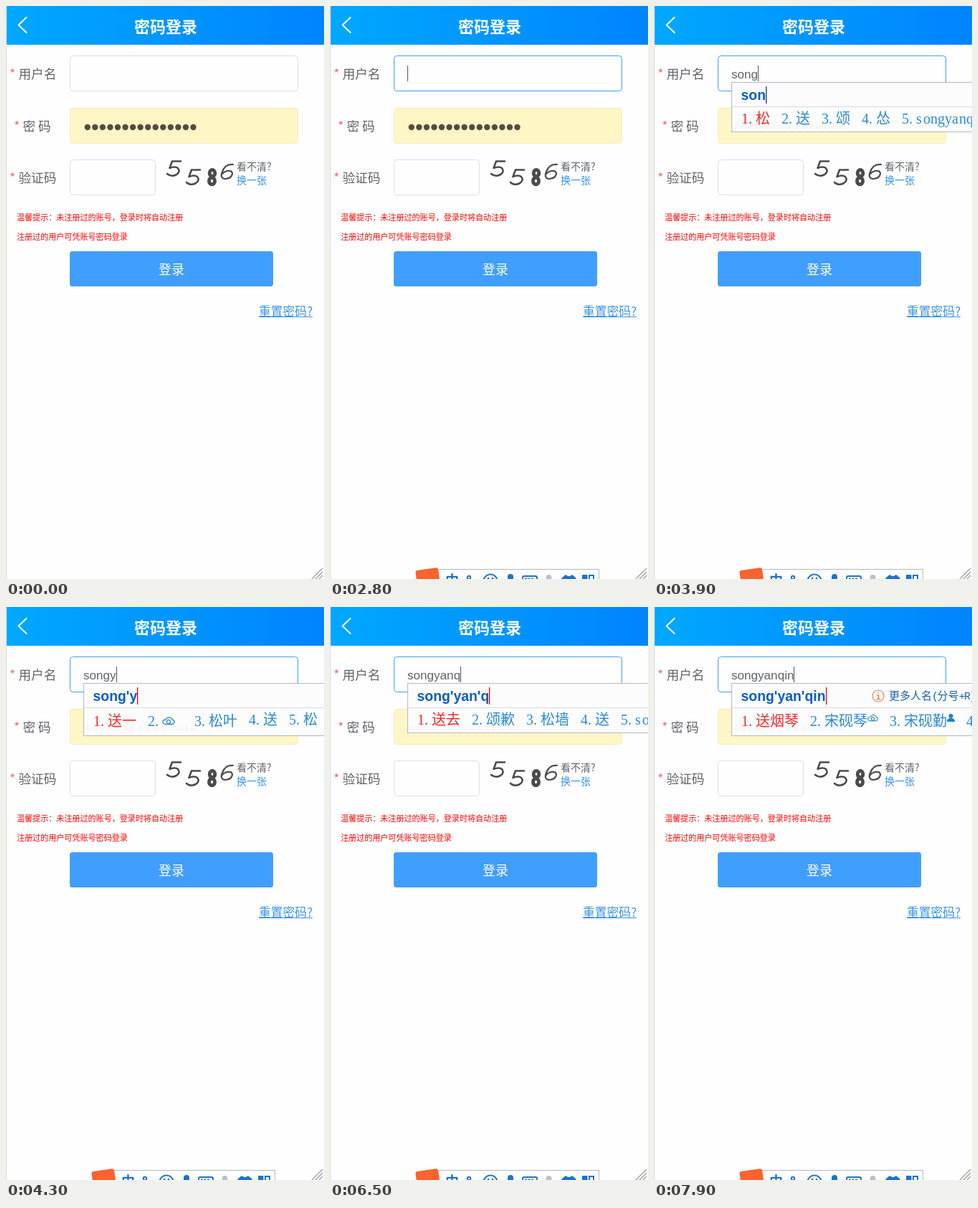
An HTML page that plays this animation: 444 px wide and 799 px high, repeating every 8000 ms.

```html
<!DOCTYPE html>
<html lang="zh-CN">
<head>
<meta charset="utf-8">
<title>密码登录</title>
<style>
  html, body { margin: 0; width: 100%; height: 100%; overflow: hidden; background: #fefefe; }
  svg { display: block; width: 444px; height: 799px; }
  text { font-family: "Noto Sans CJK SC", "Noto Sans CJK", sans-serif; white-space: pre; }
  .label { font-size: 17.6px; fill: #606266; }
  .star { font-size: 17.6px; fill: #f56c6c; }
  .hint { font-size: 11.07px; font-weight: 500; fill: #f00; }
  .box { fill: #fefefe; stroke: #dcdfe6; }
  .value { font: 17.1px "Liberation Sans", sans-serif; fill: #606266; }
  .pinyin { font: bold 19.4px "Liberation Sans", sans-serif; fill: #0b5dc2; }
  .cell { font-family: "Liberation Serif", "Noto Sans CJK SC", "Noto Sans CJK", serif; font-weight: 300; }
  .mono { font-family: "Liberation Mono", "Noto Sans CJK SC", "Noto Sans CJK", monospace; }
  .line { fill: none; stroke-linecap: round; stroke-linejoin: round; }
</style>
</head>
<body>
<svg viewBox="0 0 444 799">
  <defs>
    <linearGradient id="sky"><stop stop-color="#00a8ff"/><stop offset="1" stop-color="#0084ff"/></linearGradient>
    <path id="five" d="M244 216.5H232L228.5 226Q236 223 240 226Q244 231 238 235Q231 239 225 234"/>
    <g id="cloud" class="line" stroke="#2a8ad2" stroke-width="1.3">
      <path d="M-5 4.5Q-9 3 -8 0Q-7 -2 -4 -2Q-2 -6 2 -5Q5 -4 5 -2Q9 -1 8 2Q7 4.5 4 4.5Z"/>
      <circle cy="1" r="2.6"/>
    </g>
    <g id="person" fill="#1a80cc"><circle cx="5.5" cy="3" r="3"/><path d="M0 11Q0 6 5.5 6Q11 6 11 11Z"/></g>
    <g id="info" class="line" stroke="#f2804f" stroke-width="1.2">
      <circle r="8"/><path d="M-1.5 -1H.5V4.5M-2 4.5H2.5M0 -4.5V-4" stroke-width="1.6"/>
    </g>
  </defs>

  <rect width="444" height="799" fill="#fefefe"/>
  <rect width="444" height="54" fill="url(#sky)"/>
  <rect width="1" height="799" fill="#d9dbde"/>
  <path class="line" d="M28.500 16L17.500 26.500L28.500 37" stroke="#fff" stroke-width="2"/>
  <text x="179" y="36.500" font-size="22" font-weight="900" fill="#fff">密码登录</text>

  <text class="star" x="5" y="101">*</text><text class="label" x="17.500" y="101">用户名</text>
  <text class="star" x="11" y="174">*</text><text class="label" x="23.500" y="174">密 码</text>
  <text class="star" x="5" y="246">*</text><text class="label" x="17.500" y="246">验证码</text>

  <rect id="user" class="box" x="89.500" y="69.500" width="318" height="49" rx="4"/>
  <rect x="89.500" y="142.500" width="318" height="49" rx="4" fill="#fff6c6" stroke="#fce9bb"/>
  <g id="dots" fill="#574a41"></g>
  <rect class="box" x="89.500" y="214.500" width="119" height="49" rx="4"/>

  <g class="line" stroke="#4b4b4b" stroke-width="2.600">
    <use href="#five"/><use href="#five" x="27" y="12"/>
    <g stroke-width="4.900"><ellipse cx="288" cy="233" rx="3.800" ry="4.500"/><ellipse cx="287.500" cy="244" rx="4" ry="4.700"/></g>
    <path d="M317 221Q306 220 302 231Q298 241 307 241Q315 240 316 234Q316 229 309 230Q304 231 301 235" stroke-width="2.200"/>
  </g>
  <text x="322" y="229" font-size="14" fill="#606266">看不清?</text>
  <text x="322" y="248" font-size="14" fill="#2f93f0">换一张</text>

  <text class="hint" x="15" y="299">温馨提示：未注册过的账号，登录时将自动注册</text>
  <text class="hint" x="15" y="326">注册过的用户可凭账号密码登录</text>
  <rect x="89" y="342" width="284" height="49" rx="3.500" fill="#409eff"/>
  <text x="213" y="374" font-size="18" fill="#fff">登录</text>
  <text x="353" y="432" font-size="16.800" fill="#3a94ea">重置密码?</text>
  <rect x="353" y="433" width="75" height="1" fill="#3a94ea"/>

  <g id="bar">
    <rect x="140.500" y="785.500" width="235" height="30" fill="#fefefe" stroke="#b3bac4"/>
    <rect x="121" y="785" width="32" height="32" rx="3" fill="#f9632f" transform="rotate(-8 137 800)"/>
    <text x="161" y="808" font-size="19" font-weight="700" fill="#1f73c8">中</text>
    <g class="line" stroke="#1f73c8" stroke-width="2">
      <circle cx="194" cy="797" r="2.200"/>
      <circle cx="224" cy="802" r="9.500"/>
      <path d="M221 798V800M227 798V800" stroke-width="2.500"/>
      <rect x="269" y="795" width="20" height="14" rx="2"/>
      <path d="M273 798.500H285" stroke-dasharray="1 3.500"/>
    </g>
    <rect x="248" y="792" width="8" height="16" rx="4" fill="#1f73c8"/>
    <circle cx="305.500" cy="797" r="4" fill="#b9c2cc"/>
    <path d="M329 793Q333.500 797 338 793L344 798L340 802H327L323 798Z" fill="#1f73c8"/>
    <rect x="352" y="793" width="7.500" height="10" rx="1" fill="#1f73c8"/>
    <rect x="362" y="794" width="6" height="8" fill="none" stroke="#1f73c8" stroke-width="2"/>
  </g>
  <g id="live"></g>
  <path d="M427 799L442 784M432 799L442 789M437 799L442 794" stroke="#9a9da1" stroke-width="1.300"/>
</svg>
<script>
const LOOP = 8000, TICK = 100;
const NAME = "songyanqin", SYLLABLES = [4, 7];
const VALUE_FONT = '17.1px "Liberation Sans", sans-serif';
const PINYIN_FONT = 'bold 19.4px "Liberation Sans", sans-serif';
const $ = id => document.getElementById(id);

// [time, letters in the field, letters in the input panel, candidates]
// ~ large cloud, @ small cloud, & person
const STEPS = [
  [3000, 1, 1, "是 说 宋 上 三"],
  [3300, 2, 1, "是 说 宋 上 三"],
  [3400, 2, 2, "是 说 宋 上 三"],
  [3500, 2, 2, "所 搜 锁 嗖 索"],
  [3700, 3, 2, "所 搜 锁 嗖 索"],
  [3800, 3, 3, "松 送 颂 怂 songyanq"],
  [3900, 4, 3, "松 送 颂 怂 songyanq"],
  [4000, 4, 4, "松 送 颂 怂 songyanq"],
  [4100, 4, 4, "送 松 宋 颂 songyanq"],
  [4300, 5, 5, "送一 ~ 松叶 送 松"],
  [4600, 6, 6, "送呀 松芽 松鸭 送 songyanq"],
  [4800, 7, 7, "宋砚 颂言 送烟 宋 songyanq"],
  [6500, 8, 8, "送去 颂歉 松墙 送 songyanq"],
  [6800, 9, 9, "送砚起 颂言 送烟 宋 songyanq"],
  [7000, 10, 10, "送烟琴 ~ 宋砚勤& 宋砚勤"],
  [7300, 10, 10, "送烟琴 宋砚琴@ 宋砚勤& 宋砚"]
];
// times at which the field caret toggles, starting hidden
const BLINKS = [1000, 1400, 1900, 2300, 2800, 5100, 5400, 5800, 6300, 7400, 7800];
const ICON_WIDTH = { "~": 29, "@": 15, "&": 11 };

const pen = document.createElement("canvas").getContext("2d");
function widthOf(text, font) {
  pen.font = font;
  return pen.measureText(text).width;
}

const rect = (x, y, w, h, more) => `<rect x="${x}" y="${y}" width="${w}" height="${h}" ${more}/>`;
const ramp = (t, from, to) => Math.max(0, Math.min(1, (t - from) / (to - from)));
const cellWidth = (ch, size) => ch < "\u0080" ? size / 2 : size;

// Text on a grid of half and full width cells
function cells(text, x, y, size, fill, style = "cell") {
  const xs = [];
  for (const ch of text) {
    xs.push(x);
    x += cellWidth(ch, size);
  }
  return { end: x, svg: `<text class="${style}" x="${xs.join(" ")}" y="${y}" font-size="${size}" fill="${fill}">${text}</text>` };
}

function pinyin(n) {
  return [...NAME.slice(0, n)].map((c, i) => SYLLABLES.includes(i) ? "'" + c : c).join("");
}

function icon(kind, x, y, t) {
  if (kind === "~") return `<use href="#cloud" x="${x + 9}" y="${y - 7}"/>`;
  if (kind === "@") return `<use href="#cloud" transform="translate(${x + 7.5} ${y - 11}) scale(.85)"/>`;
  return `<use href="#person" x="${x}" y="${y - 17}" opacity="${ramp(t, 7500, 7900)}"/>`;
}

function candidates(list, y, t) {
  let x = 122, out = "";
  list.split(" ").forEach((word, i) => {
    const kind = word.match(/[~@&]/)?.[0];
    const row = list.includes("~") && i > 2 ? y - 2 : y;
    const run = cells(`${i + 1}.${word.replace(/[~@&]/, "")}`, x, row, 20, i ? "#2a8ad2" : "#f22a2a");
    out += run.svg;
    x = run.end;
    if (kind) {
      out += icon(kind, x, row, t);
      x += ICON_WIDTH[kind];
    }
    x += 16;
  });
  return out;
}

function more(x, alpha) {
  return cells("更多人名(分号+R)", x, 129, 15, "#1560ad", "mono").svg +
    `<use href="#info" x="${x - 15}" y="124" opacity="${alpha}"/>`;
}

function panel([, typed, shown, list], t) {
  const tall = /[~@]/.test(list), h = tall ? 73 : 69, text = pinyin(shown);
  const caret = Math.round(121.5 + widthOf(text, PINYIN_FONT));
  let out = rect(108.5, 106.5, 400, h, 'fill="#fcfcfd" fill-opacity=".98" stroke="#b4b8be"') +
    rect(109, 140, t < 3300 ? 323 : 335, 1, 'fill="#d6d9dd"') +
    `<text class="pinyin" x="121.500" y="131">${text}</text>` +
    rect(caret, 112, 1.3, 24, `fill="${typed > shown ? "#23405f" : "#f00"}"`) +
    candidates(list, tall ? 166 : 164, t);
  if (t < 3300) {
    out += '<path class="line" d="M414 154L409.500 158.500L414 163" stroke="#c9ccd0" stroke-width="2"/>' +
      '<path class="line" d="M428 154L432.500 158.500L428 163" stroke="#f2703c" stroke-width="2"/>' +
      rect(434, 109, 34, 34, 'rx="4" fill="#fba98d" transform="rotate(-8 451 126)"');
  }
  if (t >= 5100 && t < 6500) out += more(294, .12 + .88 * ramp(t, 5100, 5400));
  if (t >= 7400) out += more(328, ramp(t, 7300, 7800));
  return out;
}

function draw(t) {
  $("user").style.stroke = t < 500 ? "#dcdfe6" : t < 1000 ? "#c0c4cc" : t < 1100 ? "#80b1e6" : "#409eff";
  $("bar").style.display = t < 1100 ? "none" : "";
  const step = STEPS.filter(s => s[0] <= t).pop();
  const value = NAME.slice(0, step ? step[1] : 0);
  let out = `<text class="value" x="108" y="101">${value}</text>`;
  if (BLINKS.filter(b => b <= t).length % 2) {
    const x = Math.round(108 + widthOf(value, VALUE_FONT));
    out += rect(x, 83, 1, 22, 'fill="#55585c"');
  }
  $("live").innerHTML = out + (step ? panel(step, t) : "");
}

$("dots").innerHTML = Array.from({ length: 15 }, (_, i) =>
  `<circle cx="${113.8 + i * 10.55}" cy="169" r="4.200"/>`).join("");

let last = -1;
const start = performance.now();
function play(now) {
  const t = Math.floor((Math.max(0, now - start) % LOOP) / TICK) * TICK;
  if (t !== last) draw(last = t);
  requestAnimationFrame(play);
}
play(start);
</script>
</body>
</html>
```
